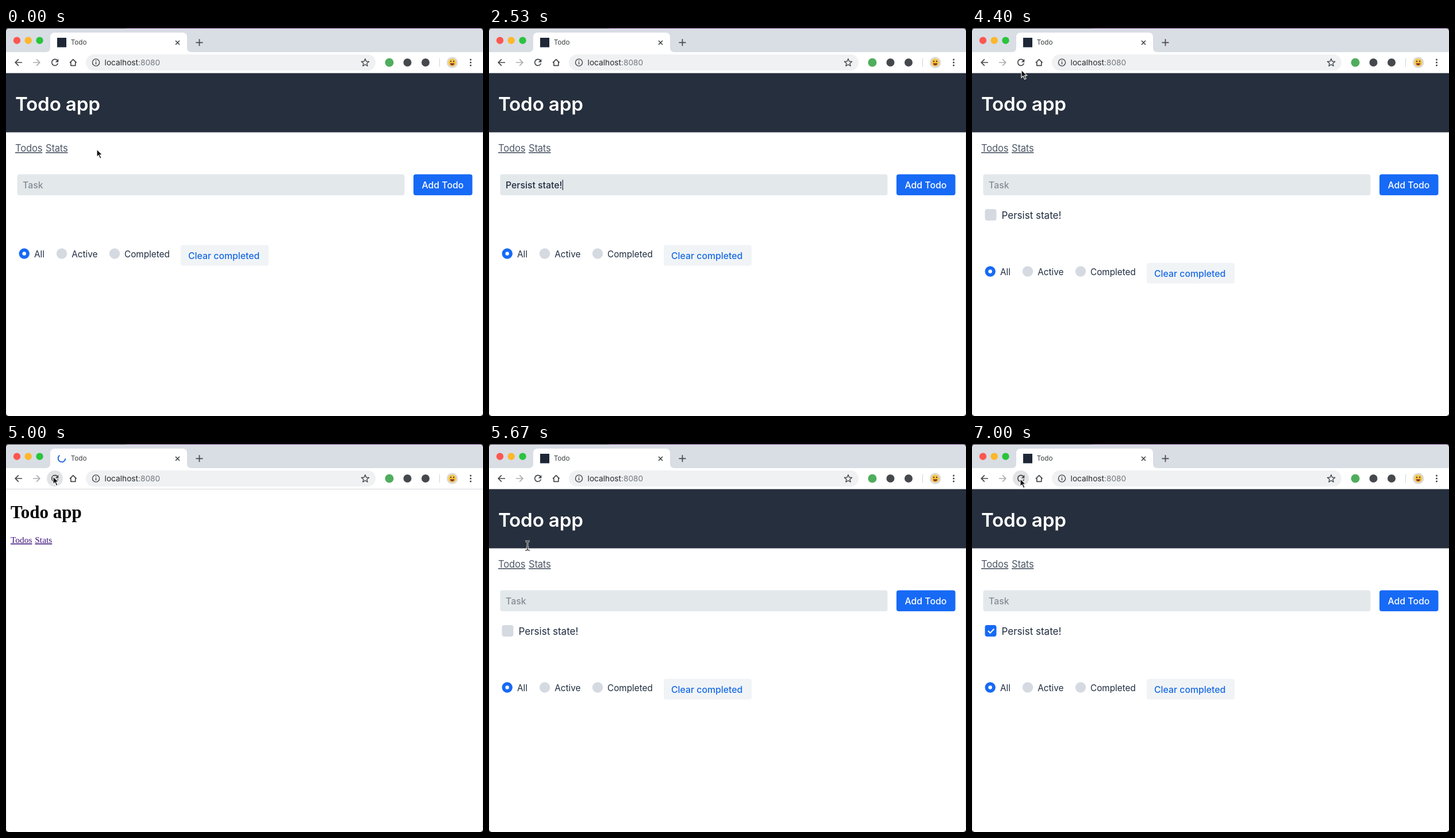
Animation of 830 by 675 pixels, one loop 7.13 s. Source, as an HTML page:

```html
<!DOCTYPE html>
<html lang="en">
<head>
<meta charset="utf-8">
<title>Todo</title>
<style>
  html, body { margin: 0; width: 100%; height: 100%; overflow: hidden; background: #fff; }
  svg { position: absolute; left: 0; top: 0; display: block; }
  text { font-family: Inter, "Open Sans", sans-serif; white-space: pre; fill: #1f2c3f; }
  .m { font-size: 15.8px; font-weight: 500; }
  .s { font-size: 15.3px; }
  .link { text-decoration: underline; }
  .nav { font-size: 16.6px; fill: #4d5867; }
  .serif { font-family: "Liberation Serif", serif; fill: #000; }
  .visited { font-size: 15.4px; fill: #40157c; }
  .icon { fill: none; stroke: #45484c; stroke-width: 1.7; }
</style>
</head>
<body>
<svg width="830" height="675" viewBox="0 0 830 675">
  <rect width="830" height="675" fill="#fff"/>

  <!-- page before styles arrive -->
  <g id="plain">
    <path d="M0 78.5H830" stroke="#d5d7da"/>
    <text class="serif" x="8" y="129" font-size="31" font-weight="700">Todo app</text>
    <text class="serif visited link" x="8" y="172">Todos</text>
    <text class="serif visited link" x="50.3" y="172">Stats</text>
  </g>

  <!-- styled page -->
  <g id="styled">
    <rect y="78.5" width="830" height="103" fill="#262f3d"/>
    <text x="16" y="143.5" font-size="33.2" font-weight="600" letter-spacing="-.2" style="fill:#fff">Todo app</text>
    <text class="nav link" x="16" y="215" letter-spacing="-.2">Todos</text>
    <text class="nav link" x="69" y="215" letter-spacing="-.2">Stats</text>
  </g>

  <g id="content">
    <rect id="field" x="19.5" y="254.5" width="674" height="36.5" rx="4"/>
    <text class="m" id="hint" x="29" y="278.8" style="fill:#848b93">Task</text>
    <text class="m" id="value" x="29" y="278.8"></text>
    <rect id="caret" y="264" width="1.2" height="18" fill="#1b2430"/>
    <rect x="709" y="254.5" width="102.5" height="36.5" rx="4" fill="#176af5"/>
    <text class="m" x="723.5" y="278.8" style="fill:#fff">Add Todo</text>

    <g id="todo">
      <rect id="box" x="22.5" y="315" width="20" height="20" rx="4"/>
      <path id="tick" d="M28 325l3.7 3.8 6.6-7" fill="none" stroke="#fff" stroke-width="2"/>
      <text x="51.5" y="332" font-size="17">Persist state!</text>
    </g>

    <g id="filters">
      <circle cx="31.7" cy="392.5" r="9.2" fill="#176af5"/>
      <circle cx="31.7" cy="392.5" r="3.2" fill="#fff"/>
      <circle cx="97" cy="392.5" r="9.2" fill="#d5dae1"/>
      <circle cx="189" cy="392.5" r="9.2" fill="#d5dae1"/>
      <text class="s" x="49" y="398.5">All</text>
      <text class="s" x="114.3" y="398.5">Active</text>
      <text class="s" x="206" y="398.5">Completed</text>
      <rect x="304" y="377.5" width="153" height="36" rx="4" fill="#f0f4f6"/>
      <text class="m" x="317" y="401.5" style="fill:#1769e6">Clear completed</text>
    </g>
  </g>

  <!-- browser window -->
  <rect width="830" height="42" fill="#d9dde4"/>
  <path d="M0 .5H830" stroke="#3d3542"/>
  <path d="M209 .5H830" stroke="#71407a"/>
  <path d="M0 6V0H6A6 6 0 0 0 0 6ZM830 6V0H824A6 6 0 0 1 830 6ZM0 670V675H5A5 5 0 0 1 0 670ZM830 670V675H825A5 5 0 0 0 830 670Z" fill="#2b2b30"/>
  <path d="M.5 182V669M829.5 182V669" stroke="#e6e7e9"/>
  <path d="M69 42Q77 42 77 34V16Q77 8 85 8H307Q315 8 315 16V34Q315 42 323 42Z" fill="#fff"/>
  <rect y="42" width="830" height="36" fill="#fff"/>
  <circle cx="19" cy="21.7" r="6.2" fill="#fc5650"/>
  <circle cx="38.7" cy="21.7" r="6.2" fill="#fcb72b"/>
  <circle cx="58.5" cy="21.7" r="6.2" fill="#28c53c"/>
  <rect id="favicon" x="89" y="17" width="16" height="16.5" fill="#1d2736"/>
  <path id="spinner" d="M93.4 19.8A6.3 6.3 0 1 0 103.3 25.4" fill="none" stroke="#2a6be0" stroke-width="2"/>
  <text x="112.7" y="29.3" font-size="11.7" style="fill:#3c4043">Todo</text>
  <path class="icon" d="M295 22l7 7m0-7l-7 7" stroke-width="1.5"/>
  <path class="icon" d="M330.5 25.3h12m-6-6v12"/>

  <circle id="reloadHover" cx="85" cy="60" r="14" fill="#e2e3e5"/>
  <circle id="homeHover" cx="117" cy="60" r="14" fill="#f4f5f6"/>
  <path class="icon" d="M28 60H16.5M21.8 54.3L16.2 60l5.6 5.7"/>
  <path class="icon" d="M47 60h11.5M53.2 54.3l5.6 5.7-5.6 5.7" style="stroke:#aaadb1"/>
  <path class="icon" d="M89.4 56.3A5.5 5.5 0 1 0 90.4 61.6"/>
  <path d="M91.3 53.8v5.6h-5.6z" fill="#45484c"/>
  <path class="icon" d="M111 60.3l5.8-5.7 5.8 5.7M112.8 59v6.3h8V59" stroke-linejoin="round"/>
  <rect x="139" y="46" width="504" height="28" rx="14" fill="#eff1f3"/>
  <circle class="icon" cx="156.5" cy="60" r="6.1" style="stroke-width:1.4"/>
  <path class="icon" d="M156.5 59v4.2M156.5 56.2v1.5" style="stroke-width:1.5"/>
  <text x="171.6" y="64.8" font-size="13.7" style="fill:#25282c">localhost<tspan fill="#73777c">:8080</tspan></text>
  <path id="star" class="icon" stroke-linejoin="round" style="stroke-width:1.4"/>
  <circle cx="667" cy="60" r="7.5" fill="#4fae5d"/>
  <circle cx="698.5" cy="60" r="7" fill="#45484c"/>
  <circle cx="730" cy="60" r="7" fill="#45484c"/>
  <path d="M754.5 52.5V67.5" stroke="#d0d3d7"/>
  <circle cx="776.5" cy="60" r="9.8" fill="#dcdad8"/>
  <circle cx="776.5" cy="60" r="6.8" fill="#f6c644"/>
  <path d="M772.8 61.2h7.4a3.7 3.7 0 0 1-7.4 0z" fill="#8a3b24"/>
  <circle cx="774" cy="58" r="1.2" fill="#5b3a1c"/>
  <circle cx="779" cy="58" r="1.2" fill="#5b3a1c"/>
  <g fill="#45484c">
    <circle cx="808.5" cy="55" r="1.5"/><circle cx="808.5" cy="60" r="1.5"/><circle cx="808.5" cy="65" r="1.5"/>
  </g>

  <!-- pointer shapes, hot spot at 0,0 -->
  <g id="pointer">
    <path id="arrow" d="M0 0V13.4L3.1 10.5 5.6 16.2 8 15.1 5.5 9.6H9.7Z" fill="#111" stroke="#fff" stroke-width="1.1"/>
    <g id="beam" fill="none">
      <path d="M-4-8.2Q0-8.2 0-5.5Q0-8.2 4-8.2M0-5.5V5.5M-4 8.2Q0 8.2 0 5.5Q0 8.2 4 8.2M-2.3 3H2.3" stroke="#e8e8e8" stroke-width="2.8"/>
      <path d="M-4-8.2Q0-8.2 0-5.5Q0-8.2 4-8.2M0-5.5V5.5M-4 8.2Q0 8.2 0 5.5Q0 8.2 4 8.2M-2.3 3H2.3" stroke="#333" stroke-width="1.2"/>
    </g>
    <path id="hand" d="M-1.5 0Q0-1.6 1.3 0V5.5Q5-.1 7.5 7.5V11L6 15H-2L-5.5 9Q-5 7-1.5 9Z" fill="#fff" stroke="#222"/>
  </g>
</svg>
<script>
const LOOP = 7130, RATE = 15;
const TEXT = "Persist state!";
const el = {};
document.querySelectorAll("[id]").forEach(n => el[n.id] = n);

// [tick, letters typed]
const TYPING = [[11, 1], [13, 2], [14, 3], [16, 4], [17, 6], [20, 7], [21, 8],
  [25, 9], [27, 10], [28, 11], [30, 12], [31, 13], [36, 14], [42, 0]];

// [tick, x, y] of the pointer's hot spot
const PATH = [[0, 158, 211], [1, 152, 219], [3, 128, 246], [5, 118, 256], [51, 118, 258],
  [54, 135, 299], [55, 137, 303], [57, 123, 254], [59, 106, 165], [61, 93, 107],
  [62, 93, 107], [64, 89, 86], [66, 86, 73], [67, 85, 66], [69, 83, 58], [74, 82, 56.5],
  [84, 82, 56.5], [85, 67, 177], [86, 48, 254], [88, 28, 323], [90, 29, 325],
  [92, 42, 278], [94, 88, 125], [95, 106, 67], [96, 92, 70], [97, 88, 66], [99, 84, 60.5],
  [107, 84, 60.5]];

const CARET = [[2, 8], [11, 47], [54, 61], [69, 74]];

const within = (k, a, b) => k >= a && k < b;
const show = (node, on) => node.style.display = on ? "" : "none";

el.star.setAttribute("d", "M" + Array.from({ length: 10 }, (_, i) => {
  const r = i % 2 ? 3 : 7, a = i * Math.PI / 5;
  return (625 + r * Math.sin(a)).toFixed(2) + " " + (60.5 - r * Math.cos(a)).toFixed(2);
}).join("L") + "Z");

function pointerAt(k) {
  const i = PATH.findIndex(p => p[0] > k);
  const [t0, x0, y0] = PATH[i - 1], [t1, x1, y1] = PATH[i];
  const u = (k - t0) / (t1 - t0);
  return [x0 + (x1 - x0) * u, y0 + (y1 - y0) * u];
}

function pointerShape(x, y) {
  if (within(y, 201, 218) && (within(x, 16, 65) || within(x, 69, 111))) return "hand";
  return within(y, 254, 291) || within(y, 100, 181) ? "beam" : "arrow";
}

function draw(k) {
  const bare = within(k, 74, 77);
  show(el.plain, bare);
  show(el.styled, !bare);
  show(el.content, !within(k, 74, 78) && !within(k, 102, 104));

  const typed = TYPING.reduce((n, [t, count]) => k >= t ? count : n, 0);
  el.value.textContent = TEXT.slice(0, typed);
  show(el.hint, !typed);
  show(el.caret, CARET.some(([a, b]) => within(k, a, b)));
  el.caret.setAttribute("x", 29.5 + (typed ? el.value.getComputedTextLength() : 0));

  const added = k >= 42, done = k >= 89;
  show(el.todo, added);
  show(el.tick, done);
  el.box.setAttribute("fill", done ? "#176af5" : "#d5dae1");
  el.filters.setAttribute("transform", `translate(0 ${added ? 31 : 0})`);

  const loading = within(k, 72, 79) || within(k, 100, 105);
  show(el.favicon, !loading);
  show(el.spinner, loading);
  el.spinner.setAttribute("transform", `rotate(${(k - 75) * 40} 97 25.4)`);

  const [x, y] = pointerAt(k), shape = pointerShape(x, y);
  show(el.pointer, !within(k, 11, 51));
  el.pointer.setAttribute("transform", `translate(${x} ${y})`);
  for (const name of ["arrow", "beam", "hand"]) show(el[name], name === shape);
  el.field.setAttribute("fill", within(k, 86, 94) && shape === "beam" && y > 250 ? "#dce1e6" : "#e3e8eb");
  show(el.reloadHover, Math.hypot(x - 85, y - 60) < 9);
  show(el.homeHover, within(k, 95, 97));
}

const start = performance.now();
let last = -1;
function tick() {
  const t = (performance.now() - start) % LOOP;
  const k = Math.floor((t + 4) * RATE / 1000) % 107;
  if (k !== last) draw(last = k);
  requestAnimationFrame(tick);
}
tick();
</script>
</body>
</html>
```
